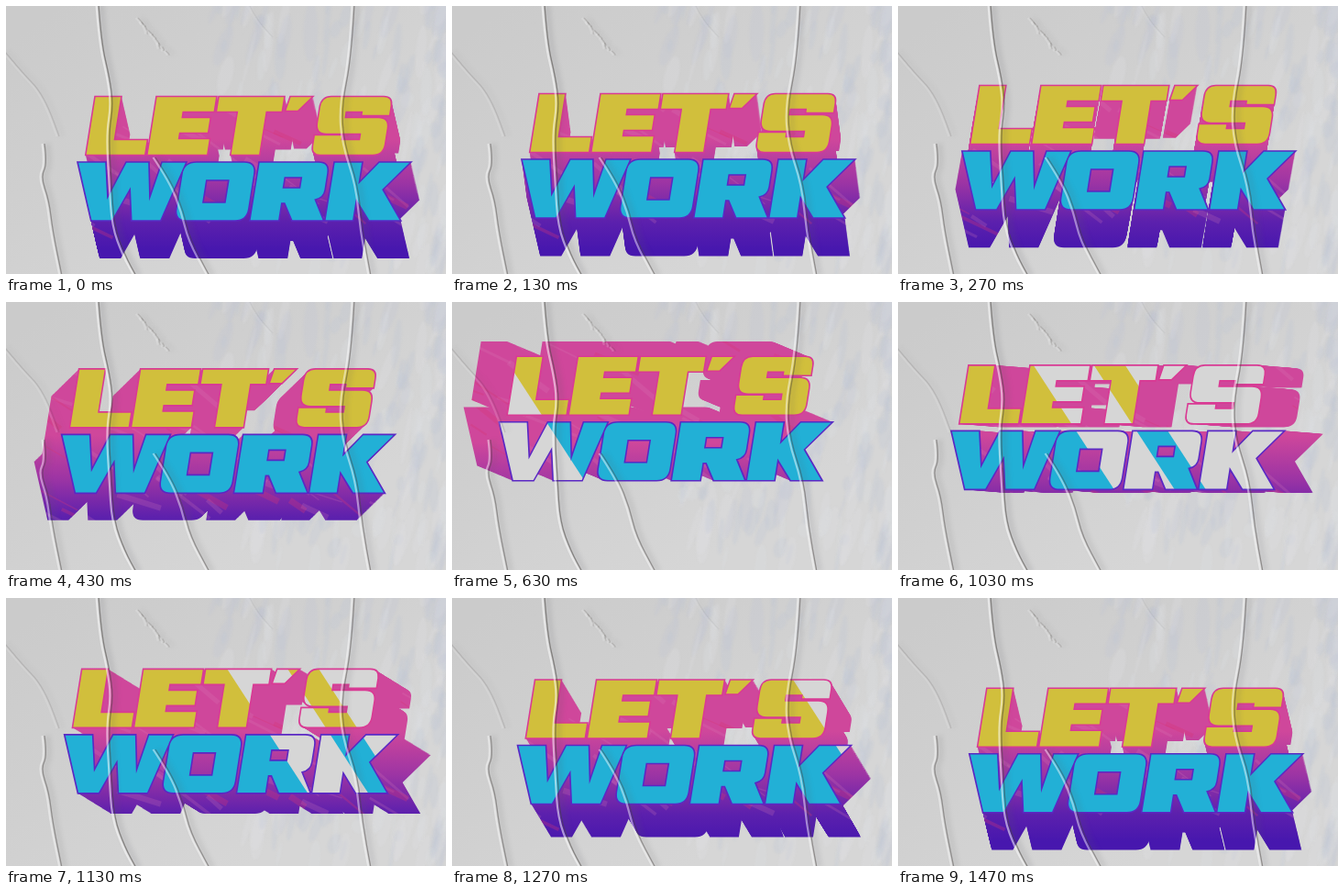
Write an HTML page with a canvas that moves like this. It is 480 px wide and 292 px high and loops after 1.51 s.

```html
<!DOCTYPE html>
<html lang="en">
<head>
<meta charset="utf-8">
<title>Let's work</title>
<style>
html, body { margin: 0; overflow: hidden; background: #cfcfcf; }
canvas { display: block; }
</style>
</head>
<body>
<canvas id="stage" width="480" height="292" role="img" aria-label="LET'S WORK"></canvas>
<script>
const W = 480, H = 292, LOOP = 1510, SLANT = 0.16, DEPTH = 42;

const words = [
  {
    y: 98.5, fill: '#d1bf3c', line: '#d93a94',
    path: new Path2D(
      'M87 0h29v47h36v17h-65z' +
      'M154 0h66v17h-34v6h31v17h-31v6h34v18h-66z' +
      'M222 0h72v17h-17v47h-32v-47h-23z' +
      'M300 0h25l-14 16h-14z' +
      'M345 0h57q10 0 10 10v11h-31v-4h-17v6h36q12 0 12 12v17q0 12-12 12h-57q-10 0-10-10v-12h31v5h19v-6h-37q-12 0-12-12v-17q0-12 11-12z')
  },
  {
    y: 170, fill: '#22b0d6', line: '#5a28c4',
    path: new Path2D(
      'M68 0H99L107 38L121 0H146L153 38L160 0H187L169 64H137L130 30L116 64H93z' +
      'M198 0H250q13 0 13 13V51q0 13-13 13H197q-13 0-13-13V13q0-13 14-13zM212 20V44H236V20z' +
      'M266 0H331q12 0 12 12V30q0 9-9 11L347 64H312L301 45H298V64H266zM297 17V28H315V17z' +
      'M348 0H379V22L397 0H432L406 30L431 64H396L379 42V64H348z')
  }
];

const stage = document.getElementById('stage').getContext('2d');
const newLayer = () => Object.assign(document.createElement('canvas'), { width: W, height: H }).getContext('2d');
const paper = newLayer(), folds = newLayer(), art = newLayer();

let seed = 7;
const rand = (a = 0, b = 1) => {
  seed = (seed * 16807) % 2147483647;
  return a + (b - a) * seed / 2147483647;
};

function drawPaper() {
  const g = paper.createLinearGradient(60, 0, 260, H);
  g.addColorStop(0, '#cbcbcb');
  g.addColorStop(0.5, '#d0d0d0');
  g.addColorStop(1, '#d6d6d6');
  paper.fillStyle = g;
  paper.fillRect(0, 0, W, H);
  // worn, bluish streaks towards the right
  paper.filter = 'blur(1px)';
  for (let i = 0; i < 200; i++) {
    const x = W - 250 * rand() ** 1.6, y = rand(-20, H);
    paper.fillStyle = rand() < 0.55 ? 'rgba(190,197,214,.24)' : 'rgba(222,223,227,.26)';
    paper.beginPath();
    paper.ellipse(x, y, rand(1.5, 8), rand(6, 34), rand(0, 0.4), 0, 7);
    paper.fill();
  }
  paper.filter = 'none';
}

function curve(ctx, pts, dx) {
  ctx.beginPath();
  ctx.moveTo(pts[0] + dx, pts[1]);
  let i = 2;
  for (; i < pts.length - 2; i += 2)
    ctx.quadraticCurveTo(pts[i] + dx, pts[i + 1],
      (pts[i] + pts[i + 2]) / 2 + dx, (pts[i + 1] + pts[i + 3]) / 2);
  ctx.lineTo(pts[i] + dx, pts[i + 1]);
}

function fold(strength, ...pts) {
  const layers = [
    [4, 7, 'rgba(90,90,95,.13)', 2],
    [-1.5, 2.2, 'rgba(255,255,255,.6)', 0.6],
    [1, 1.3, 'rgba(75,70,68,.6)', 0.4]
  ];
  for (const [dx, width, color, blur] of layers) {
    folds.globalAlpha = strength;
    folds.filter = `blur(${blur}px)`;
    folds.lineWidth = width;
    folds.strokeStyle = color;
    curve(folds, pts, dx);
    folds.stroke();
  }
}

function drawFolds() {
  fold(0.9, 100, -2, 103, 40, 112, 78, 116, 108, 111, 140, 114, 193, 117, 240, 129, 272, 141, 294);
  fold(0.8, 379, -2, 376, 55, 365, 110, 368, 150, 383, 195, 388, 245, 397, 294);
  fold(0.75, 41, 150, 44, 172, 37, 186, 46, 212, 50, 245, 60, 294);
  fold(0.75, 162, 165, 180, 192, 193, 225, 200, 255, 221, 294);
  fold(0.25, -2, 50, 18, 74, 34, 90, 46, 112, 57, 142);
  fold(0.1, 264, -2, 272, 14, 290, 34);
  for (let i = 0; i < 9; i++) {
    const x = 143 + i * 3.8, y = 13 + i * 4.5;
    fold(0.3, x, y, x + rand(0, 4), y + 3, x + rand(1, 6), y + rand(4, 9));
  }
  folds.filter = 'none';
}

function place(word, x, y) {
  art.setTransform(1, 0, -SLANT, 1, 10 + x, word.y + y);
}

// diagonal strip between two positions along the wipe
function strip(from, to) {
  const lean = y => 0.65 * (y - 58);
  art.beginPath();
  art.moveTo(from + lean(0), 0);
  art.lineTo(to + lean(0), 0);
  art.lineTo(to + lean(H), H);
  art.lineTo(from + lean(H), H);
  art.fill();
}

// light and crimson scuffs on the sides of the letters
function drawScuffs() {
  seed = 41;
  for (let i = 0; i < 70; i++) {
    const x = rand(0, W), y = rand(0, 230), len = rand(15, 60);
    art.strokeStyle = i % 3 ? 'rgba(222,125,185,.2)' : 'rgba(214,50,115,.3)';
    art.lineWidth = rand(1, 7);
    art.beginPath();
    art.moveTo(x, y);
    art.lineTo(x + len, y + len * rand(0.3, 0.9));
    art.stroke();
  }
}

function drawExtrusion(x, y, angle) {
  const dx = DEPTH * Math.cos(angle), dy = DEPTH * Math.sin(angle);
  art.fillStyle = '#000';
  for (let i = 0; i <= DEPTH; i++)
    for (const word of words) {
      place(word, x + dx * i / DEPTH, y + dy * i / DEPTH);
      art.fill(word.path, 'evenodd');
    }
  art.resetTransform();
  const top = 145 + Math.max(0, -dy) / 2;
  const g = art.createLinearGradient(0, top, 0, top + 120);
  g.addColorStop(0, '#cf479b');
  g.addColorStop(0.4, '#9c34a4');
  g.addColorStop(0.75, '#5c20ad');
  g.addColorStop(1, '#4717ae');
  art.globalCompositeOperation = 'source-in';
  art.fillStyle = g;
  art.fillRect(0, 0, W, H);
  art.globalCompositeOperation = 'source-atop';
  drawScuffs();
  art.globalCompositeOperation = 'source-over';
}

function drawFront(word, x, y, wipe) {
  art.save();
  place(word, x, y);
  art.fillStyle = '#d6d6d6';
  art.fill(word.path, 'evenodd');
  art.clip(word.path, 'evenodd');
  art.resetTransform();
  art.fillStyle = word.fill;
  strip(-2000, wipe);
  strip(wipe + 66, wipe + 100);
  strip(wipe + 267, 2000);
  art.restore();
  place(word, x, y);
  art.strokeStyle = word.line;
  art.lineWidth = 1.6;
  art.stroke(word.path);
  art.resetTransform();
}

function frame(now) {
  const t = now % LOOP, p = t / LOOP;
  const sway = (1 - Math.cos(2 * Math.PI * p)) / 2;
  const turn = p < 0.5 ? 2 * p * p : 1 - 2 * (1 - p) ** 2;
  const x = -28.5 * sway, y = -42 * sway;
  const angle = (77 + 360 * turn) * Math.PI / 180;
  const wipe = 351 + 0.88 * (t - 1270);

  art.clearRect(0, 0, W, H);
  drawExtrusion(x, y, angle);
  for (const word of words) drawFront(word, x, y, wipe);

  stage.drawImage(paper.canvas, 0, 0);
  stage.drawImage(art.canvas, 0, 0);
  stage.drawImage(folds.canvas, 0, 0);
  requestAnimationFrame(frame);
}

drawPaper();
drawFolds();
requestAnimationFrame(frame);
</script>
</body>
</html>
```
